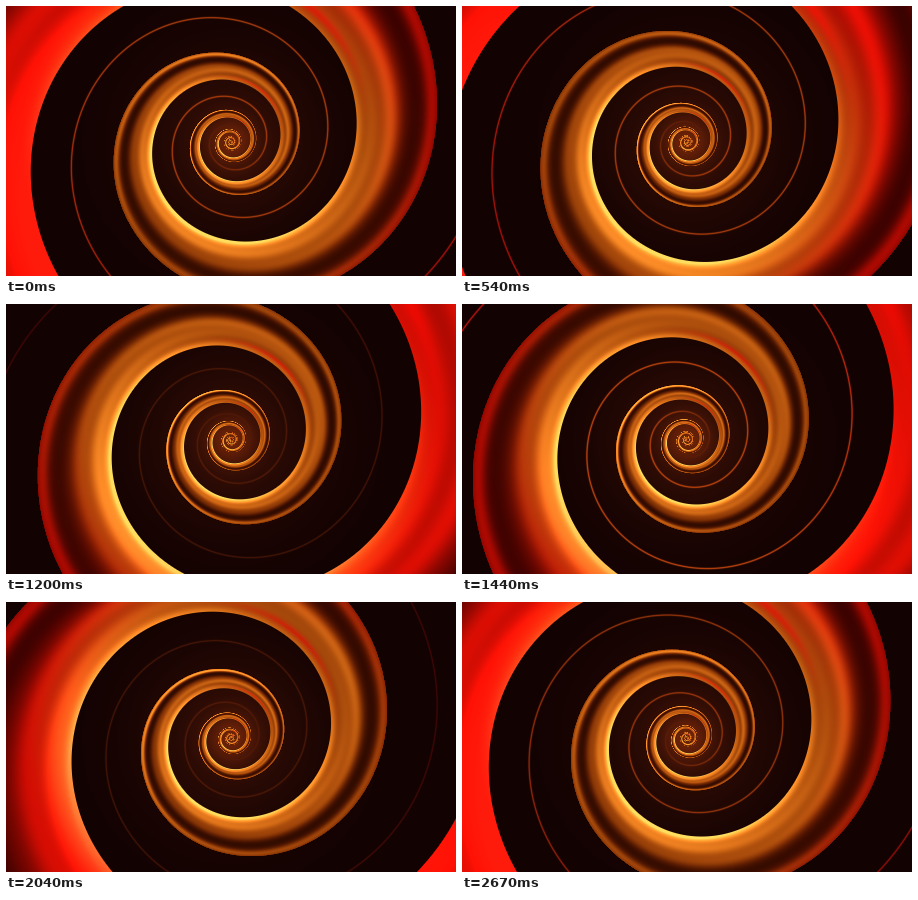
These frames come from a looping animation (450 px wide and 270 px high, 2.7 s). An HTML page with a canvas:

```html
<!DOCTYPE html>
<html>
<head>
<meta charset="utf-8">
<style>
html, body { margin: 0; width: 100%; height: 100%; overflow: hidden; background: #140303; }
canvas { display: block; }
</style>
</head>
<body>
<canvas id="stage" width="450" height="270"></canvas>
<script>
const W = 450, H = 270, CX = 225, CY = 136, LOOP = 2700, STEP = 30;
const TAU = Math.PI * 2;
const ctx = document.getElementById('stage').getContext('2d');
const image = ctx.createImageData(W, H);
const px = image.data;

const clamp = x => x < 0 ? 0 : x > 1 ? 1 : x;
const smooth = (x, a, b) => { x = clamp((x - a) / (b - a)); return x * x * (3 - 2 * x); };
const bell = (x, c, w) => { x = (x - c) / w; return x * x > 9 ? 0 : Math.exp(-x * x); };
const facing = (turn, peak) => 0.5 + 0.5 * Math.cos(TAU * (turn - peak));

// Spirals as ln r over turns; the outer edge opens slightly faster as it grows
const OUT_START = Math.log(116), OUT_GROWTH = 1.093, OUT_BEND = 0.053;
const IN_START = Math.log(78), IN_GROWTH = 0.932;
const LINE_START = Math.log(58), LINE_GROWTH = 1;
const outerAt = u => OUT_START + u * (OUT_GROWTH + u * OUT_BEND);
const innerAt = u => IN_START + u * IN_GROWTH;
const outerTurns = w =>
  (Math.sqrt(OUT_GROWTH ** 2 + 4 * OUT_BEND * (w - OUT_START)) - OUT_GROWTH) / (2 * OUT_BEND);

// Per-pixel values that do not change with time
const polar = [];
for (let y = 0; y < H; y++) for (let x = 0; x < W; x++) {
  const dx = x + 0.5 - CX, dy = y + 0.5 - CY;
  const r = Math.max(1.5, Math.hypot(dx, dy));
  const turn = (Math.PI - Math.atan2(dy, dx)) / TAU;
  const logR = Math.log(r);
  polar.push({
    r, turn, logR,
    outTurns: outerTurns(logR),
    lit: facing(turn, 0.14),
    rim: 0.24 + 0.36 * facing(turn, 0.88) * (1 - smooth(r, 50, 140)),
    red: smooth(r, 130, 212),
    streak: bell(turn, 0.66, 0.08),
    lineFade: smooth(r, 14, 40),
    glow: bell(r, 0, 85),
    core: bell(r, 0, 24)
  });
}

function draw(time) {
  const phase = time / LOOP;
  const lineAlpha = clamp(0.6 + 0.9 * Math.cos(2 * TAU * (phase - 0.1)));
  let i = 0;
  for (const { r, turn, logR, outTurns, lit, rim, red, streak, lineFade, glow, core } of polar) {
    const v = turn + phase;
    const u = v + Math.ceil(outTurns - v);
    const outer = outerAt(u), inner = innerAt(u);
    const p = (logR - inner) / (outer - inner);
    const cover = clamp((logR - inner) * r + 0.5) * clamp((outer - logR) * r + 0.5);

    let R = 18 + 32 * glow + 60 * core, G = 2 + 11 * glow + 22 * core, B = 2 + 3 * glow + 4 * core;
    if (cover < 1) {
      const k = (logR - LINE_START) / LINE_GROWTH - v;
      const gap = (k - Math.round(k)) * LINE_GROWTH * r;
      const a = lineAlpha * lineFade * bell(gap, 0, 0.9);
      R += (175 - R) * a;
      G += (62 - 45 * red - G) * a;
      B += (12 - B) * a;
    }
    if (cover > 0) {
      let light = 0.28
        + (0.2 + 0.36 * lit) * bell(p, 0, 0.46)
        + (0.06 + 0.2 * lit) * bell(p, 0, 0.09)
        + 0.24 * (1 - lit) * bell(p, 0.48, 0.15)
        - 0.16 * bell(p, 0.75, 0.15)
        + rim * bell(p, 0.94, 0.07)
        + 0.12 * red * (1 - p)
        + 0.12 * core;
      light *= 1 + 0.06 * Math.sin(p * 24 + u * 4);
      const s = streak * bell(p, 0.14, 0.06);
      light = clamp(light + 0.15 * s);
      const warm = (1 - 0.88 * red) * (1 - 0.65 * s);
      R += (255 * Math.min(1, light * 1.33) - R) * cover;
      G += (222 * Math.pow(light, 1.55) * warm - G) * cover;
      B += (95 * light * light * light * warm - B) * cover;
    }
    px[i++] = R; px[i++] = G; px[i++] = B; px[i++] = 255;
  }
  ctx.putImageData(image, 0, 0);
}

let shown = -1;
function tick() {
  const step = Math.floor(performance.now() % LOOP / STEP);
  if (step !== shown) draw((shown = step) * STEP);
  requestAnimationFrame(tick);
}
tick();
</script>
</body>
</html>
```
